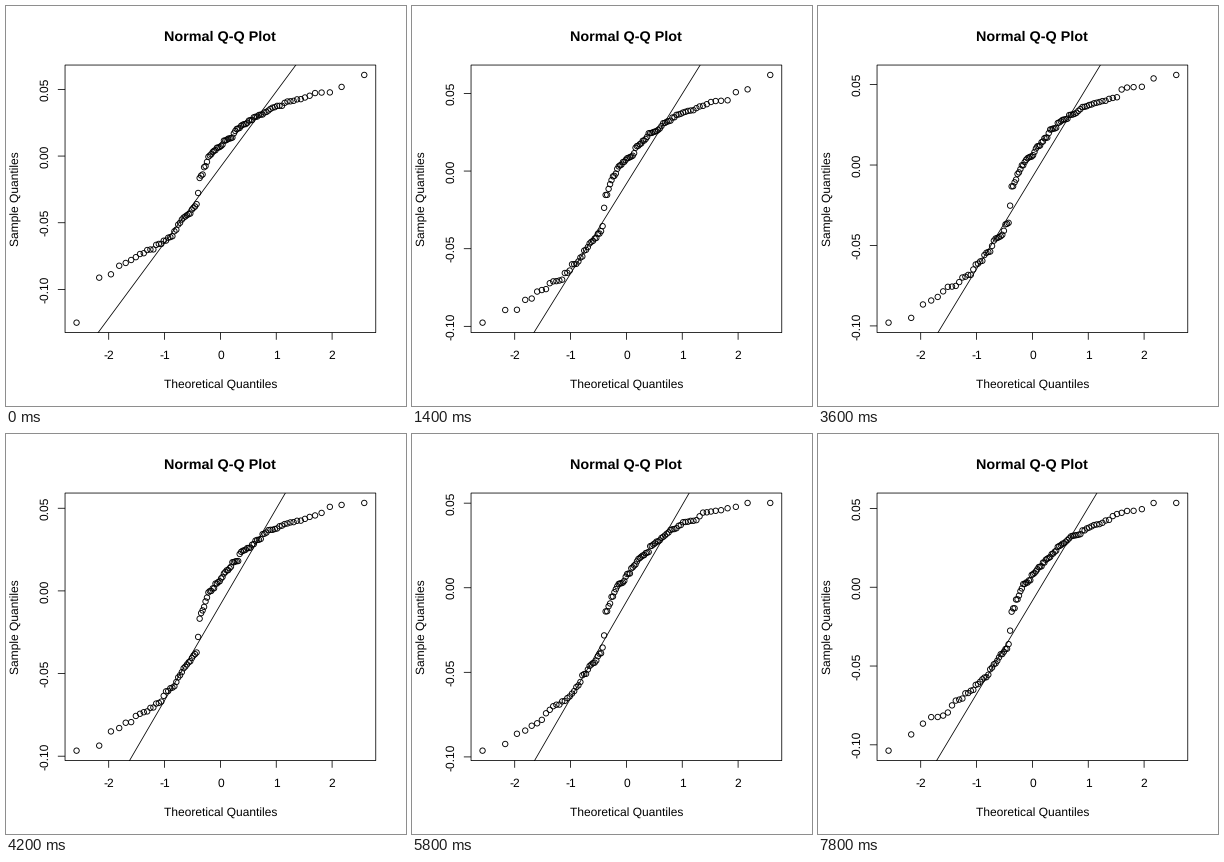
Recreate the animation shown at these times as a matplotlib script. Size 400 by 400 pixels, loop 8 s.

```python
import math

import numpy as np
import matplotlib.pyplot as plt
from matplotlib.animation import FuncAnimation
from matplotlib.collections import EllipseCollection
from matplotlib.patches import Rectangle

plt.rcParams["font.family"] = "Liberation Sans"
plt.rcParams["text.hinting"] = "none"

SIZE, DPI = 400, 100
PT = 72 / DPI  # points per pixel
FRAMES, INTERVAL = 40, 200
N = 100
LEFT, RIGHT, TOP, BOTTOM = 59.04, 369.76, 59.04, 326.56
MID_X, MID_Y = (LEFT + RIGHT) / 2, (TOP + BOTTOM) / 2
TICK = 7.2
LINE = 0.8
STEP = 0.05

# Typical residual at a few ranks, in thousandths: two groups with a gap between
BODY = [(2, -92), (6, -79), (13, -68), (20, -58), (26, -47), (34, -37), (36, -16),
        (42, -2), (50, 7), (60, 17), (66, 23), (77, 32), (88, 40), (97, 47), (99, 51)]
# Smallest and largest residual over the loop, as (frame, value)
LOW = [(0, -124), (1, -97), (14, -99), (25, -95), (34, -98), (39, -103)]
HIGH = [(0, 60.6), (7, 63.4), (14, 55.4), (18, 55.6), (25, 51.1), (34, 52), (39, 54.7)]

grid = np.linspace(-4, 4, 4001)
cdf = [0.5 * (1 + math.erf(g / math.sqrt(2))) for g in grid]


def qnorm(p):
    return np.interp(p, cdf, grid)


theory = qnorm((np.arange(N) + 0.5) / N)
ranks, levels = np.array(BODY).T
curve = np.interp(theory, qnorm((ranks - 0.5) / N), levels)
X_SCALE = (RIGHT - LEFT) / (1.08 * 2 * theory[-1])


def to_x(z):
    return MID_X + z * X_SCALE


def sample(frame):
    """Sorted residuals of one frame."""
    rng = np.random.default_rng(100 + frame)
    low, high = (np.interp(frame, *zip(*keys)) + rng.normal(0, 0.8)
                 for keys in (LOW, HIGH))
    values = np.clip(curve + rng.normal(0, 1.5, N), low, high)
    values[0], values[-1] = low, high
    return np.sort(values) / 1000


fig = plt.figure(figsize=(SIZE / DPI, SIZE / DPI), dpi=DPI, facecolor="white")
ax = fig.add_axes([0, 0, 1, 1])
ax.set(xlim=(0, SIZE), ylim=(SIZE, 0))
ax.axis("off")


def label(x, y, text, size=12, angle=0, weight="normal"):
    return ax.text(x, y, text, fontsize=size * PT, rotation=angle, weight=weight,
                   ha="center", va="baseline", rotation_mode="anchor")


def stroke(xs=(), ys=()):
    return ax.plot(xs, ys, color="black", lw=LINE * PT, snap=False,
                   solid_capstyle="butt")[0]


box = Rectangle((LEFT, TOP), RIGHT - LEFT, BOTTOM - TOP, fill=False, ec="black",
                lw=LINE * PT, snap=False)
ax.add_patch(box)
label(MID_X, 34.3, "Normal Q-Q Plot", 14.4, weight="bold")
label(MID_X, 381.6, "Theoretical Quantiles")
label(13.5, MID_Y, "Sample Quantiles", angle=90)

for z in range(-2, 3):
    stroke([to_x(z)] * 2, [BOTTOM, BOTTOM + TICK])
    label(to_x(z), 353, str(z))

ticks = [(stroke(), label(42.3, 0, "", angle=90)) for _ in range(5)]
fit = stroke()
fit.set_clip_path(box)
dots = EllipseCollection(np.full(N, 5.4), np.full(N, 5.4), np.zeros(N), units="xy",
                         offsets=np.zeros((N, 2)), offset_transform=ax.transData,
                         facecolors="none", edgecolors="black", linewidths=0.9 * PT)
ax.add_collection(dots)


def update(frame):
    values = sample(frame)
    pad = 0.04 * (values[-1] - values[0])
    low, high = values[0] - pad, values[-1] + pad

    def to_y(v):
        return BOTTOM - (v - low) / (high - low) * (BOTTOM - TOP)

    dots.set_offsets(np.column_stack([to_x(theory), to_y(values)]))

    # Line through the quartiles
    q1, q3 = np.quantile(values, [0.25, 0.75])
    z3 = qnorm(0.75)
    slope = (q3 - q1) / (2 * z3)
    ends = np.array([-3.0, 3.0])
    fit.set_data(to_x(ends), to_y(q1 + slope * (ends + z3)))

    for k, (mark, text) in enumerate(ticks, math.ceil(low / STEP)):
        v = k * STEP
        y = to_y(v)
        mark.set_data([LEFT - TICK, LEFT], [y, y])
        text.set_y(y)
        text.set_text(f"{v:.2f}")
        for part in (mark, text):
            part.set_visible(v <= high)
    return []


anim = FuncAnimation(fig, update, frames=FRAMES, interval=INTERVAL,
                     repeat=True, repeat_delay=0, blit=False)
plt.show()
```
